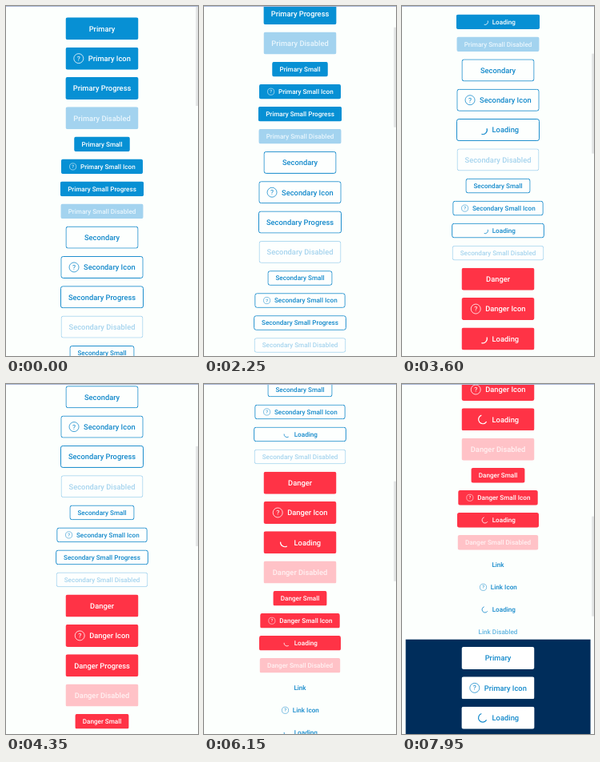
An HTML page for the animation above (8 s loop, 240x438 px).

```html
<!DOCTYPE html>
<html lang="en">
<head>
<meta charset="utf-8">
<title>Button showcase</title>
<style>
html, body { margin: 0; width: 100%; height: 100%; overflow: hidden; background: #fcfffd; }
svg { display: block; }
text { font-family: Roboto, Arial, sans-serif; font-weight: 500; text-rendering: geometricPrecision; }
.mark { font-weight: 400; }
</style>
</head>
<body>
<svg id="stage" width="240" height="438" viewBox="0 0 240 438"></svg>
<script>
const LOOP = 8000;
const GAP = 9.33;
const SCROLL = { start: 1155, speed: 0.08553, thumb: 0.285 };
const TOGGLES = [600, 1800, 3040, 4180, 5450, 6760, 7790]; // on, off, on, ...
const SLIDE = { time: 100, travel: 12, stagger: 9 };
const BLUE = '#0790d4', RED = '#ff3346', INK = '#1389cb';

const SIZES = {
  big: { h: 28, font: 9.33, icon: 13.33, gap: 5.33, r: 6, min: 91 },
  small: { h: 18.67, font: 8.13, icon: 10.67, gap: 4, r: 4.1, min: 0 }
};
const STYLES = {
  Primary: { fill: BLUE, text: '#fff', off: { fill: '#a3d3ef', text: '#e9f6fd' } },
  Secondary: { fill: '#fdfffe', line: INK, text: INK, off: { fill: '#fdfffe', line: '#a6d4ee', text: '#a6d4ee' } },
  Danger: { fill: RED, text: '#fff', off: { fill: '#ffc2c7', text: '#fff1f2' } },
  Link: { fill: 'none', text: INK, off: { fill: 'none', text: '#5fb4e0' } },
  Inverse: { fill: '#fff', text: INK }
};

const stage = document.getElementById('stage');
const spinners = [], progress = [];

function add(parent, tag, attrs = {}, content) {
  const node = document.createElementNS('http://www.w3.org/2000/svg', tag);
  for (const key in attrs) node.setAttribute(key, attrs[key]);
  if (content) node.textContent = content;
  return parent.appendChild(node);
}

// Centred row of an optional glyph and a label; returns its group and width.
function label(parent, str, size, color, glyph) {
  const g = add(parent, 'g');
  const text = add(g, 'text', { y: size.font * 0.355, 'font-size': size.font, fill: color }, str);
  const lead = glyph ? size.icon + size.gap : 0;
  const width = text.getComputedTextLength() + lead;
  text.setAttribute('x', lead - width / 2);
  const cx = (size.icon - width) / 2;
  if (glyph === 'help') {
    add(g, 'circle', { cx, r: size.r, fill: 'none', stroke: color, 'stroke-width': size.r * 0.13 });
    add(g, 'text', {
      class: 'mark', x: cx, y: size.r * 0.5, 'font-size': size.r * 1.42, fill: color, 'text-anchor': 'middle'
    }, '?');
  } else if (glyph === 'spin') {
    const arc = add(g, 'path', { fill: 'none', stroke: color, 'stroke-width': size.r * 0.2 });
    spinners.push({ arc, cx: cx + 0.4, r: size.r * 0.9 });
  }
  return { g, width };
}

function button(parent, y, kind, str, size, variant) {
  const base = STYLES[kind];
  const look = variant === 'Disabled' ? base.off : base;
  const box = add(parent, 'svg', { y, height: size.h, overflow: 'hidden' });
  const rect = add(box, 'rect', { rx: 2.7, fill: look.fill });
  const body = add(box, 'g');
  const idle = label(body, str, size, look.text, variant === 'Icon' && 'help');
  const w = Math.max(size.min, idle.width + 18.67 + (look.line ? 1.33 : 0));
  const inset = look.line ? 0.5 : 0;
  const place = { x: inset, y: inset, width: w - 2 * inset, height: size.h - 2 * inset };
  for (const key in place) rect.setAttribute(key, place[key]);
  if (look.line) rect.setAttribute('stroke', look.line);
  box.setAttribute('x', 120 - w / 2);
  box.setAttribute('width', w);
  body.setAttribute('transform', `translate(${w / 2} ${size.h / 2})`);
  if (variant === 'Progress') {
    progress.push({ idle: idle.g, busy: label(body, 'Loading', size, look.text, 'spin').g });
  }
}

const list = add(stage, 'g');
let y = 14.3;
function section(kind, name, size, variants = ['', 'Icon', 'Progress', 'Disabled']) {
  for (const v of variants) {
    button(list, y, kind, v ? `${name} ${v}` : name, size, v);
    y += size.h + GAP;
  }
}
for (const kind of ['Primary', 'Secondary', 'Danger']) {
  section(kind, kind, SIZES.big);
  section(kind, kind + ' Small', SIZES.small);
}
section('Link', 'Link', SIZES.small);
add(list, 'rect', { x: 4.6, y: y - GAP, width: 231, height: 200, fill: '#002d5b' });
section('Inverse', 'Primary', SIZES.big, ['', 'Icon', 'Progress']);

const thumb = add(stage, 'rect', { x: 237.3, width: 2.7, height: 125, fill: '#e2e4e4' });
add(stage, 'rect', { width: 240, height: 1, fill: '#aab9d6' });

// How far the busy label has slid in, from 0 to 1.
function busyAmount(t) {
  const last = TOGGLES.filter(at => at <= t).length - 1;
  if (last < 0) return 0;
  const u = Math.min(1, (t - TOGGLES[last]) / SLIDE.time);
  const s = u * u * (3 - 2 * u);
  return last % 2 ? 1 - s : s;
}

// Time since the busy state last began.
function busyAge(t) {
  const starts = TOGGLES.filter((at, i) => i % 2 === 0 && at <= t);
  return starts.length ? t - starts[starts.length - 1] : 0;
}

function arcPath(cx, r, from, sweep) {
  const point = deg => {
    const a = deg * Math.PI / 180;
    return `${cx + r * Math.sin(a)} ${-r * Math.cos(a)}`;
  };
  return `M${point(from)}A${r} ${r} 0 ${sweep > 180 ? 1 : 0} 1 ${point(from + sweep)}`;
}

function shift(node, dy, opacity) {
  node.setAttribute('transform', `translate(0 ${dy})`);
  node.setAttribute('opacity', opacity);
}

function render(t) {
  const scroll = Math.max(0, t - SCROLL.start) * SCROLL.speed;
  list.setAttribute('transform', `translate(0 ${-scroll})`);
  thumb.setAttribute('y', scroll * SCROLL.thumb);

  progress.forEach(({ idle, busy }, i) => {
    const p = busyAmount(t - i * SLIDE.stagger);
    shift(idle, -SLIDE.travel * p, 1 - p * p);
    shift(busy, SLIDE.travel * (1 - p), p);
  });
  const x = busyAge(t) - 160;
  const wave = Math.cos(2 * Math.PI * x / 930);
  const from = 120 + 0.569 * x + 43 * (1 - wave);
  const sweep = 172 + 50 * wave;
  for (const { arc, cx, r } of spinners) arc.setAttribute('d', arcPath(cx, r, from, sweep));
}

const begin = performance.now();
function tick() {
  render((performance.now() - begin) % LOOP);
  requestAnimationFrame(tick);
}
tick();
</script>
</body>
</html>
```
